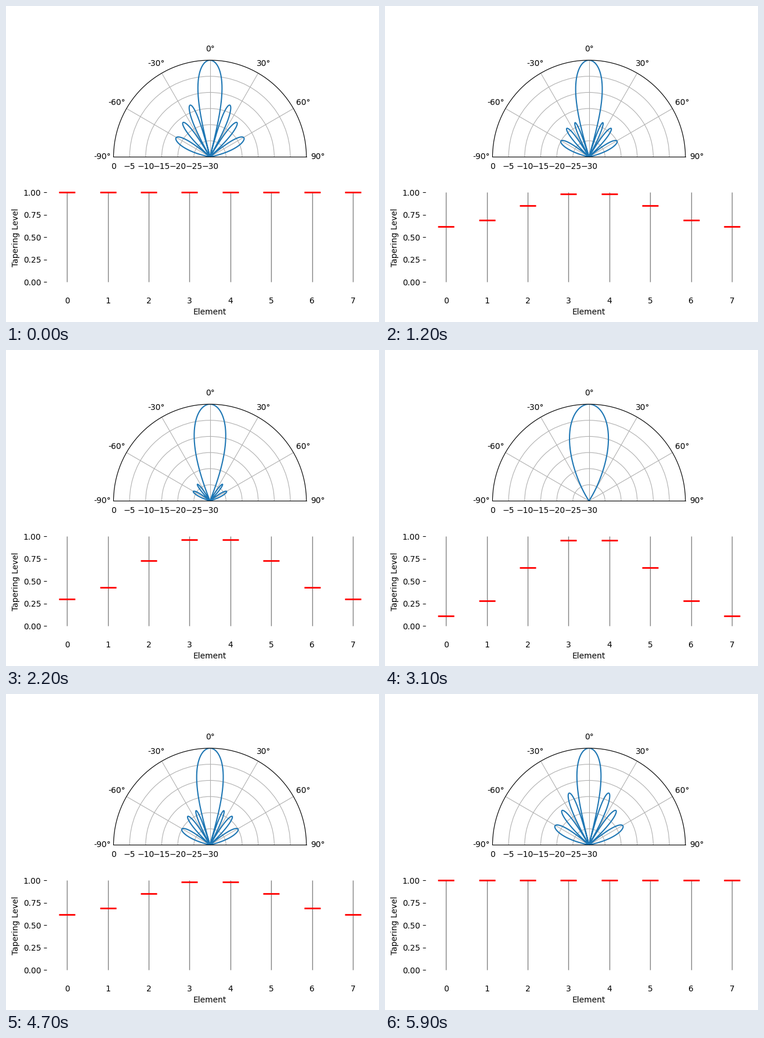
A matplotlib script that plays this animation: 643 px wide and 543 px high, repeating every 6000 ms.

```python
import numpy as np
import matplotlib.pyplot as plt
from matplotlib.animation import FuncAnimation

W, H, DPI = 643, 543, 100
N = 8          # array elements, half a wavelength apart
STEPS = 30     # uniform to Hamming, then back again
FLOOR = -30    # dB

elements = np.arange(N)
hamming = np.hamming(N)
theta = np.linspace(-np.pi / 2, np.pi / 2, 1001)
steering = np.exp(1j * np.pi * np.outer(np.sin(theta), elements))


def px_rect(left, top, width, height):
    """Axes rectangle from pixels measured from the top left corner."""
    return [left / W, 1 - (top + height) / H, width / W, height / H]


def taper(frame):
    step = min(frame, 2 * STEPS - 1 - frame)
    return 1 - (1 - hamming) * step / (STEPS - 1)


def pattern(weights):
    gain = np.abs(steering @ weights) / weights.sum()
    return 20 * np.log10(np.maximum(gain, 10 ** (FLOOR / 20)))


def bars(weights):
    return [[(x - 0.2, w), (x + 0.2, w)] for x, w in zip(elements, weights)]


fig = plt.figure(figsize=(W / DPI, H / DPI), dpi=DPI, facecolor="white")

# Element weights
ax = fig.add_axes(px_rect(70.0, 305.05, 563.2, 184.8))
ax.vlines(elements, 0, 1, color="gray", lw=1)
levels = ax.hlines(np.ones(N), elements - 0.2, elements + 0.2, color="red", lw=2)
ax.set_xlim(-0.5, N - 0.5)
ax.set_ylim(-0.1, 1.1)
ax.set_xticks(elements)
ax.set_yticks(np.linspace(0, 1, 5))
ax.tick_params(axis="x", bottom=False)
ax.spines[:].set_visible(False)
ax.set_xlabel("Element")
ax.set_ylabel("Tapering Level")

# Radiation pattern; the half disc sits centred in a square box
polar = fig.add_axes(px_rect(185.4, 10.0, 332.4, 332.4), projection="polar")
beam, = polar.plot(theta, pattern(taper(0)), color="C0", lw=1.5)
polar.set_theta_zero_location("N")
polar.set_theta_direction(-1)
polar.set_xticks(np.radians(np.arange(-90, 91, 30)))
polar.set_yticks(np.arange(FLOOR, 1, 5))
polar.set_thetamin(-90)
polar.set_thetamax(90)
polar.set_ylim(FLOOR, 0)


def update(frame):
    weights = taper(frame)
    beam.set_ydata(pattern(weights))
    levels.set_segments(bars(weights))
    return beam, levels


anim = FuncAnimation(fig, update, frames=2 * STEPS, interval=100,
                     repeat=True, repeat_delay=0, blit=False)
plt.show()
```
